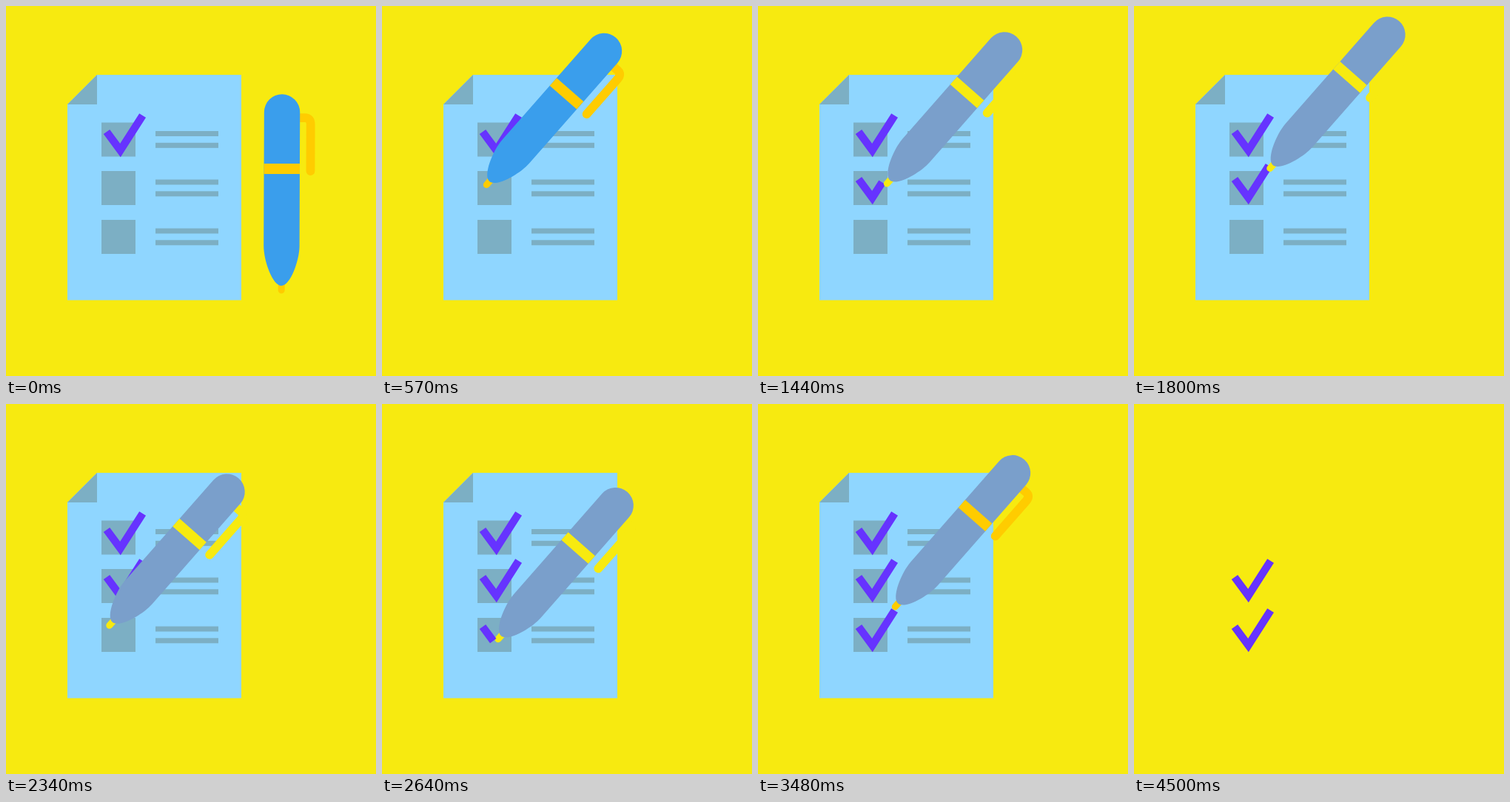
Recreate the animation shown at these times as an HTML page. Size 500 px wide and 500 px high, loop 4530 ms.

```html
<!DOCTYPE html>
<html lang="en">
<head>
<meta charset="utf-8">
<title>Checklist</title>
<style>
  html, body { margin: 0; width: 100%; height: 100%; overflow: hidden; background: #f7ea10; }
  svg { display: block; width: 100vw; height: 100vh; }
</style>
</head>
<body>
<svg viewBox="0 0 500 500">
  <rect width="500" height="500" fill="#f7ea10"/>
  <g id="sheet">
    <path d="M123 93H318V397.5H83V133Z" fill="#8fd6ff"/>
    <path d="M123 93V133H83Z" fill="#7cafc4"/>
    <g id="rows" fill="#7cafc4"></g>
  </g>
  <g fill="none" stroke="#6633ff" stroke-width="10.5" stroke-miterlimit="8">
    <path id="check1"/>
    <path id="check2"/>
  </g>
  <g id="pen">
    <path class="trim" d="M0-12V0" fill="none" stroke-width="9" stroke-linecap="round"/>
    <path class="trim" d="M20-233H31Q38.7-233 38.7-224V-161" fill="none" stroke-width="11.8" stroke-linecap="round"/>
    <path id="body" d="M-24.2-240.5A24.2 24.2 0 0 1 24.2-240.5V-60C24.2-40 12-6 0-6S-24.2-40-24.2-60Z"/>
    <path class="trim" d="M-24.2-164H24.2" stroke-width="14"/>
  </g>
  <path id="check3" fill="none" stroke="#6633ff" stroke-width="10.5" stroke-miterlimit="8"/>
</svg>
<script>
const LOOP = 4530, STEP = 30, CLEAR = 4500;
const byId = id => document.getElementById(id);
const lerp = (a, b, u) => a + (b - a) * u;
const progress = (t, from, to) => Math.min(1, Math.max(0, (t - from) / (to - from)));

// time, nib x, nib y, tilt in degrees
const penKeys = [
  [0, 372.2, 384, 0.2],
  [120, 248.3, 361.6, 41.3],
  [570, 141.3, 241.6, 41.3],
  [720, 141.3, 241.6, 41.3],
  [1110, 165.7, 258.9, 41.3],
  [1860, 185.3, 216, 41.3],
  [2160, 185.3, 216, 41.3],
  [2340, 139.8, 299.3, 41.3],
  [2730, 162.1, 323.3, 41.3],
  [3480, 185.3, 274, 41.3],
  [LOOP, 185.3, 274, 41.3]
];

// start time, body colour, trim colour
const penLooks = [
  [0, '#3a9eec', '#ffcc00'],
  [1290, '#7a9fcb', '#f7ea10'],
  [2730, '#4f9ff2', '#ffcc00'],
  [3270, '#7a9fcb', '#ffcc00']
];

const rect = (x, y, w, h) => `<rect x="${x}" y="${y}" width="${w}" height="${h}"/>`;
byId('rows').innerHTML = [157.5, 223, 289].map(y =>
  rect(129, y, 46, 46) + rect(202, y + 11.5, 85, 7) + rect(202, y + 27.3, 85, 7)
).join('');

function penPose(t) {
  const i = penKeys.findIndex(key => key[0] > t);
  const a = penKeys[i - 1], b = penKeys[i];
  const u = progress(t, a[0], b[0]);
  return a.map((value, k) => lerp(value, b[k], u));
}

function checkPath(dy, left, right) {
  if (left <= 0) return '';
  let d = `M136 ${170 + dy}L${lerp(136, 154.5, left)} ${lerp(170, 195, left) + dy}`;
  if (right > 0) d += `L${lerp(154.5, 184.6, right)} ${lerp(195, 148, right) + dy}`;
  return d;
}

function drawCheck(id, dy, t, start) {
  const left = progress(t, start, start + 390);
  const right = progress(t, start + 390, start + 1140);
  byId(id).setAttribute('d', checkPath(dy, left, right));
}

function render(t) {
  const shown = t < CLEAR ? 'visible' : 'hidden';
  for (const id of ['sheet', 'pen', 'check1']) byId(id).setAttribute('visibility', shown);

  const [, x, y, tilt] = penPose(t);
  byId('pen').setAttribute('transform', `translate(${x} ${y}) rotate(${tilt})`);
  const [, body, trim] = penLooks.filter(look => look[0] <= t).pop();
  byId('body').setAttribute('fill', body);
  document.querySelectorAll('.trim').forEach(part => part.setAttribute('stroke', trim));

  drawCheck('check2', 64, t, 720);
  drawCheck('check3', 131, t, 2340);
}

byId('check1').setAttribute('d', checkPath(0, 1, 1));
render(0);
let origin;
function tick(now) {
  origin ??= now;
  render(Math.floor(((now - origin) % LOOP) / STEP) * STEP);
  requestAnimationFrame(tick);
}
requestAnimationFrame(tick);
</script>
</body>
</html>
```
